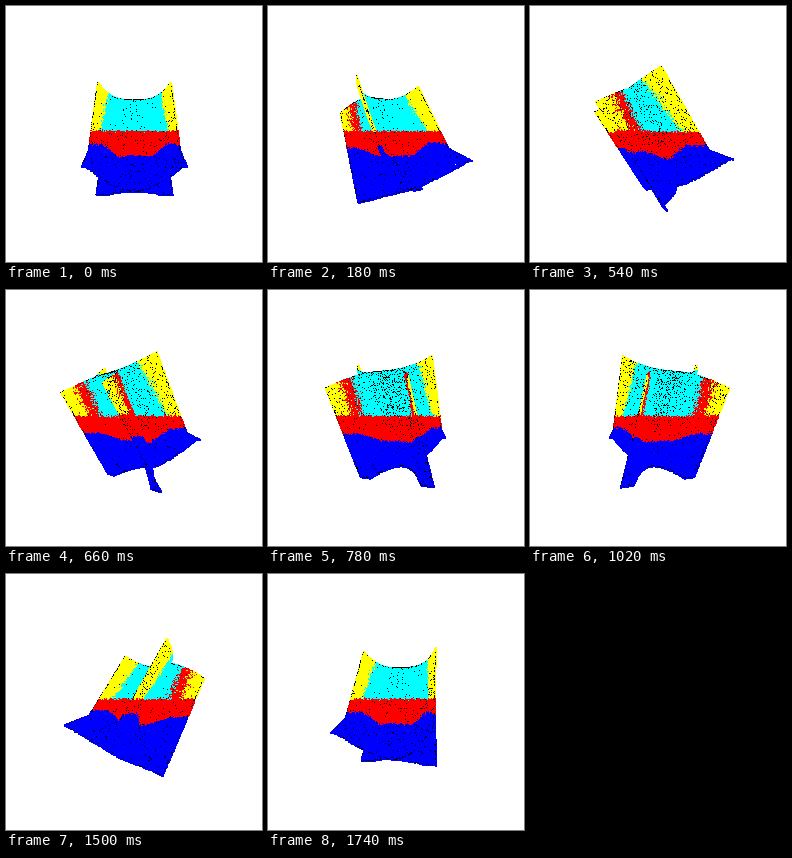
Recreate the animation shown at these times as a matplotlib script. Size 256 by 256 pixels, loop 1800 ms.

```python
import numpy as np
import matplotlib.pyplot as plt
from matplotlib.animation import FuncAnimation

SIZE, FRAMES, STEP = 256, 30, 60
CENTER, CAMERA = 128, 200
COLS, ROWS = 170, 145

YELLOW, CYAN, RED, BLUE, BLACK = range(5)
PALETTE = np.array([[255, 255, 0], [0, 255, 255], [255, 0, 0],
                    [0, 0, 255], [0, 0, 0]], dtype=np.uint8)
SPECKS = np.array([0.12, 0.09, 0.06, 0.02, 0])

rng = np.random.default_rng(4)


def along(t, stops, points):
    """Follow a polyline of (x, y, z) points; z faces the viewer."""
    points = np.array(points, float)
    return [np.interp(t, stops, points[:, i]) for i in range(3)]


def sheet(stops, edge, upper, ledge, drop, fuzz):
    """A curved wall, mirrored left to right, with its colour labels."""
    a, t = np.meshgrid(np.linspace(-1, 1, COLS), np.linspace(0, 1, ROWS))
    a, t = a.ravel(), t.ravel()
    rim = (np.abs(a) > 0.99) | (t < 0.004) | (t > 0.996)
    a = np.clip(a + rng.normal(0, 0.004, a.size) * ~rim, -1, 1)
    t = np.clip(t + rng.normal(0, 0.002, t.size) * ~rim, 0, 1)

    ex, ey, ez = along(t, stops, edge)
    _, my, mz = along(t, [0, 1], [(0, -40, -32), (0, 52, 18)])
    # The fold is tight at the top and opens to a flat ledge at the bottom
    reach = np.abs(a) / (1 - ledge * t ** 4)
    bend = np.minimum(reach, 1) ** (3.6 - 1.6 * t)
    x = a * ex
    y = my + bend * (ey - my)
    z = mz + bend * (ez - mz)

    label = upper(np.abs(a) + rng.normal(0, fuzz, a.size), t)
    level = y + rng.normal(0, 0.6, y.size)
    low = 22 - drop * np.clip((np.abs(x) - 17) / 14, 0, 1)
    label = np.where(level > -3, RED, label)
    label = np.where(level > low, BLUE, label)
    return np.array([x, y, z, label, rim])


def front_label(a, t):
    return np.where(a > 0.78 + 0.16 * t, YELLOW, CYAN)


def back_label(a, t):
    return np.where(a > 0.86, YELLOW, np.where(a > 0.71, RED, CYAN))


front = sheet([0, 0.78, 1],
              [(38.5, -54.5, -10), (38, 14, 34), (37, 23, 60)],
              front_label, ledge=0.1, drop=13, fuzz=0.02)
back = sheet([0, 1], [(35, -24, -60), (39, 62, -5)],
             back_label, ledge=0.3, drop=8, fuzz=0.04)
X, Y, Z, LABEL, RIM = np.hstack([front, back])
LABEL = LABEL.astype(int)
CHANCE = rng.random(X.size)


def render(k):
    angle = 2 * np.pi * k / FRAMES
    c, s = np.cos(angle), np.sin(angle)
    near = Z * c - X * s
    scale = CAMERA / (CAMERA - near)
    px = np.floor(CENTER + (X * c + Z * s) * scale).astype(int)
    py = np.floor(CENTER + Y * scale).astype(int)

    # Specks thicken where the wall comes close to the viewer
    speck = 0.004 + SPECKS[LABEL] * np.clip(near / 55, 0, 1)
    dark = CHANCE < np.where(RIM > 0, 0.25, speck)
    color = np.where(dark, BLACK, LABEL)

    order = np.argsort(near + 2 * dark, kind="stable")
    px, py, color, dark = px[order], py[order], color[order], dark[order]
    # Coloured points cover 2 x 2 pixels, dark ones a single pixel
    offset = np.array([(0, 0), (1, 0), (0, 1), (1, 1)])
    offset = offset * (~dark)[:, None, None]
    gx = (px[:, None] + offset[:, :, 0]).ravel()
    gy = (py[:, None] + offset[:, :, 1]).ravel()

    top = np.full(SIZE * SIZE, -1)
    np.maximum.at(top, gy * SIZE + gx, np.repeat(np.arange(px.size), 4))
    image = np.full((SIZE * SIZE, 3), 255, np.uint8)
    hit = top >= 0
    image[hit] = PALETTE[color[top[hit]]]
    return image.reshape(SIZE, SIZE, 3)


fig = plt.figure(figsize=(2.56, 2.56), dpi=100, facecolor="white")
ax = fig.add_axes([0, 0, 1, 1])
ax.axis("off")
picture = ax.imshow(render(0), interpolation="nearest", aspect="auto")


def update(k):
    picture.set_data(render(k))
    return [picture]


anim = FuncAnimation(fig, update, frames=FRAMES, interval=STEP,
                     repeat=True, repeat_delay=0, blit=False)
plt.show()
```
